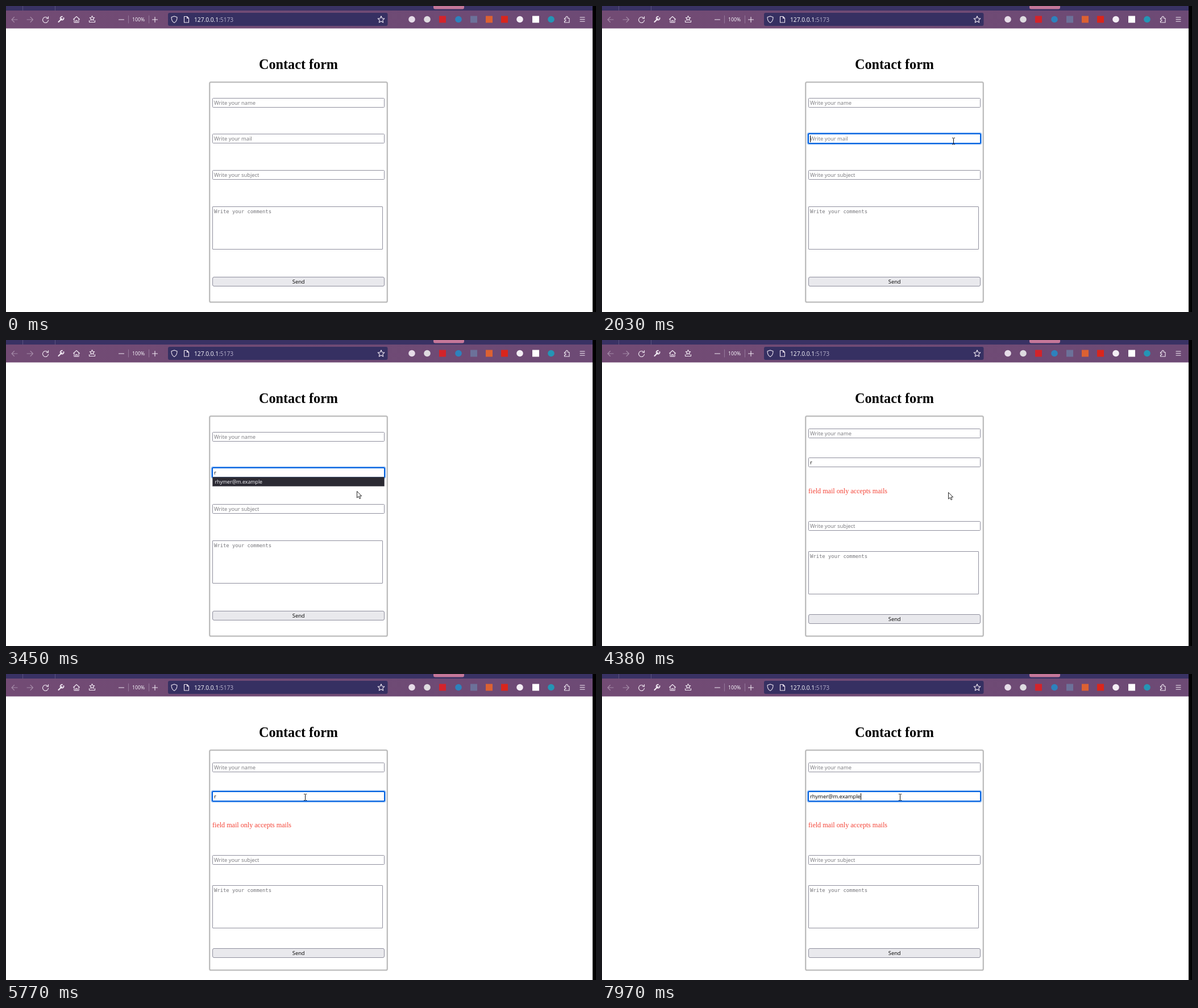
Recreate the animation shown at these times as an HTML page. Size 1038 px wide and 539 px high, loop 8 s.

```html
<!DOCTYPE html>
<html lang="en">
<head>
<meta charset="utf-8">
<title>Contact form</title>
<style>
  html, body { margin: 0; width: 100%; height: 100%; overflow: hidden; background: #fff; }
  svg { display: block; width: 1038px; height: 539px; }
  text { font: 9.35px "Open Sans", sans-serif; fill: #000; white-space: pre; }
  .hint { fill: #75757a; }
  .mono { font: 8.83px "DejaVu Sans Mono", monospace; }
  .title { font: bold 24.2px "Liberation Serif", serif; }
  .error { font: 12.1px "Liberation Serif", serif; fill: #f44336; }
  .url { font-size: 10.2px; fill: #fbfbfe; }
  .zoom { font-size: 8.7px; fill: #fbfbfe; }
  .option { font-size: 8.8px; fill: #fbfbfe; }
  .box { fill: #fff; stroke: #8f8f9d; }
  .box.hover { stroke: #676774; }
  .icons { fill: none; stroke: #f2eaf4; stroke-width: 1.1; stroke-linecap: round; stroke-linejoin: round; }
</style>
</head>
<body>
<svg viewBox="0 0 1038 539" xmlns="http://www.w3.org/2000/svg">
  <defs>
    <linearGradient id="bar">
      <stop offset="0" stop-color="#724b74"/>
      <stop offset="1" stop-color="#6d4a75"/>
    </linearGradient>
  </defs>

  <rect width="1032" height="9" fill="#393264"/>
  <path d="M29.5 0V8M86.5 0V8" stroke="#5a527f"/>
  <rect x="752" y="-6" width="54" height="11.5" rx="3" fill="#c57799"/>
  <rect y="8" width="1032" height="31.5" fill="url(#bar)"/>
  <rect x="285" y="12" width="386.5" height="23" rx="3" fill="#363062"/>
  <g class="icons">
    <path opacity=".4" d="M20 24H10M14.5 19.5L10 24L14.5 28.5M37 24H47.500M43 19.500L47.500 24L43 28.500"/>
    <path d="M73.500 21.500A5 5 0 1 0 74.500 25M74.500 18.500V22H71"/>
    <path stroke-width="2.2" d="M92.500 28L98 22.500"/>
    <path stroke-width="1.800" d="M101.500 21A3 3 0 1 1 99 18.700"/>
    <path d="M118.500 23.500L124 18.500L129.500 23.500M120 22.500V29H128V22.500M122.700 29V25.500H125.300V29"/>
    <path d="M151.500 17.500L152.800 20.300L155.700 20.600L153.500 22.500L154.200 25.300L151.500 23.900L148.800 25.300L149.500 22.500L147.300 20.600L150.200 20.300ZM146.500 25.500V28.500H156.500V25.500"/>
    <path d="M198.500 24H207.500M257.500 24H266.500M262 19.500V28.500"/>
    <path stroke="#95779a" d="M215.500 17V30M251.500 17V30"/>
    <path d="M296 18L301 19.800C301 25 299.500 27.800 296 29.500C292.500 27.800 291 25 291 19.800Z"/>
    <path d="M313.500 18.500H318.500L321.500 21.500V29H313.500ZM318.500 18.500V21.500H321.500"/>
    <path d="M660 17.800L661.800 21.700L665.800 22.100L662.800 24.900L663.700 29L660 26.900L656.300 29L657.200 24.900L654.200 22.100L658.200 21.700Z"/>
    <path d="M982.500 21.500H985V20A1.700 1.700 0 0 1 988.400 20V21.500H991V29H982.500V26.500H984A1.500 1.500 0 0 0 984 23.700H982.500Z"/>
    <path d="M1010 20H1018M1010 23.500H1018M1010 27H1018"/>
  </g>
  <g id="addons"></g>
  <text class="zoom" x="222" y="27">100%</text>
  <text class="url" x="331" y="27.500">127.0.0.1<tspan fill="#b7b1cc">:5173</tspan></text>
  <rect x="1032" width="6" height="539" fill="#000"/>

  <text class="title" x="514.500" y="111" text-anchor="middle">Contact form</text>
  <rect x="358.200" y="134.100" width="312.600" height="387.600" rx="2.500" fill="none" stroke="#bcbcbc" stroke-width="2.300"/>

  <g id="name"><rect class="box" x="363.500" y=".5" width="302" height="16" rx="1"/><text class="hint" x="366" y="12">Write your name</text></g>
  <g id="mail">
    <rect class="halo" x="361.500" y="-1.500" width="306" height="20" rx="3" fill="none" stroke="#a9cbf7" stroke-width="2"/>
    <rect class="box" x="363.500" y=".5" width="302" height="16" rx="1"/>
    <rect class="ring" x="363" y="0" width="303" height="17" rx="1.500" fill="none" stroke="#0060df" stroke-width="2"/>
    <text class="value" x="366" y="12"></text>
    <rect class="caret" y="3" width="1" height="12"/>
    <g class="list">
      <rect class="row" x="363.500" y="16.500" width="302" height="16" stroke="#55545e" stroke-width=".6"/>
      <text class="option" x="367.500" y="28">rhymer@m.example</text>
    </g>
  </g>
  <text id="error" class="error" x="363" y="270">field mail only accepts mails</text>
  <g id="subject"><rect class="box" x="363.500" y=".5" width="302" height="16" rx="1"/><text class="hint" x="366" y="12">Write your subject</text></g>
  <g id="comments"><rect class="box" x="363.500" y=".5" width="299" height="75" rx=".5"/><text class="hint mono" x="366" y="12">Write your comments</text></g>
  <g id="send"><rect x="363.500" y=".5" width="302" height="16" rx="2.500" fill="#e9e9ed" stroke="#8f8f9d"/><text x="514.700" y="12" text-anchor="middle">Send</text></g>

  <path id="arrow" d="M.5 .5V12L3.200 9.500L5 13.600L6.900 12.800L5.100 8.800H8.700Z" fill="#fff" stroke="#111" stroke-width=".9"/>
  <path id="beam" d="M-2.500 -5.500H-.8L0 -4.800L.8 -5.500H2.500M0 -4.800V4.800M-2.500 5.500H-.8L0 4.800L.8 5.500H2.500" fill="none" stroke="#111"/>
</svg>
<script>
const LOOP = 8000;
const ADDRESS = "rhymer@m.example";
const $ = selector => document.querySelector(selector);

// Toolbar badges: x, shape, colour
const badges = [
  [714, "circle", "#e6dce8"], [741, "circle", "#dedbe0"], [768, "square", "#d3242b"],
  [796, "circle", "#2d82bd"], [823, "square", "#6c7199"], [850, "square", "#dc6132"],
  [877, "square", "#d9261c"], [904, "circle", "#f3edf4"], [932, "square", "#ffffff"],
  [959, "circle", "#2495b5"]
];
$("#addons").innerHTML = badges.map(([x, shape, color]) => shape === "circle"
  ? `<circle cx="${x}" cy="23.500" r="5.800" fill="${color}"/>`
  : `<rect x="${x - 6}" y="17.500" width="12" height="12" fill="${color}"/>`).join("");

const layouts = {
  plain: { name: 162, mail: 225, subject: 289, comments: 353, send: 477 },
  invalid: { name: 156, mail: 207, subject: 319, comments: 372, send: 483 }
};
const fields = ["name", "mail", "subject", "comments"];

const easeOut = power => u => 1 - (1 - u) ** power;
const smooth = u => u * u * (3 - 2 * u);

// Pointer moves: start, end, samples, from, to, easing
const moves = [
  [450, 1210, 12, [984, 526], [666, 298], easeOut(1.5)],
  [1280, 1690, 7, [644, 281], [618, 238], easeOut(3)],
  [2950, 3450, 8, [618, 240], [617, 266], smooth],
  [4380, 4920, 9, [609, 268], [526, 217], smooth],
  [7970, 8000, 1, [524, 217], [524, 217], smooth]
];

// Typed text: time, number of characters
const typing = [[0, 0], [2690, 1], [5980, 2], [6100, 3], [6300, 4], [7220, ADDRESS.length]];

const focusTimes = [[1890, 3600], [5250, LOOP]];
const listTimes = [[2770, 3600], [6040, 7220]];
const selectTimes = [[6960, 7220]];
const caretTimes = [[1960, 2490], [2690, 3220], [5250, 5770], [5980, 6830], [7370, 7910], [7970, LOOP]];

const during = (spans, t) => spans.some(([from, to]) => t >= from && t < to);
const latest = (steps, t) => steps.filter(step => step[0] <= t).pop();
const show = (el, on) => el.setAttribute("visibility", on ? "visible" : "hidden");
const place = (el, x, y) => el.setAttribute("transform", `translate(${x} ${y})`);

function pointerAt(t) {
  const move = latest(moves, t);
  if (!move) return null;
  const [start, end, samples, from, to, ease] = move;
  const last = Math.max(1, samples - 1);
  const step = Math.min(last, Math.floor((t - start) / (end - start) * last + 0.03));
  const p = ease(step / last);
  return from.map((v, i) => Math.round(v + (to[i] - v) * p));
}

const parts = Object.fromEntries([...fields, "send"].map(id => [id, $("#" + id)]));
const [halo, ring, value, caret, list, row] =
  ["halo", "ring", "value", "caret", "list", "row"].map(name => $("#mail ." + name));
const error = $("#error"), arrow = $("#arrow"), beam = $("#beam");

function draw(t) {
  const invalid = t >= 3650;
  const tops = layouts[invalid ? "invalid" : "plain"];
  for (const id in parts) place(parts[id], 0, tops[id]);
  show(error, invalid);

  const count = latest(typing, t)[1];
  value.textContent = count ? ADDRESS.slice(0, count) : "Write your mail";
  value.setAttribute("class", count ? "value" : "value hint");
  caret.setAttribute("x", 366 + (count ? Math.round(value.getComputedTextLength()) : 0));
  show(caret, during(caretTimes, t));

  const focused = during(focusTimes, t), open = during(listTimes, t);
  show(halo, focused);
  show(ring, focused);
  show(list, open);

  const pointer = pointerAt(t);
  const [x, y] = pointer || [-99, -99];
  const listTop = tops.mail + 17;
  const overList = open && x < 667 && y >= listTop && y < listTop + 16;
  row.setAttribute("fill", overList || during(selectTimes, t) ? "#42414d" : "#2b2a33");

  const hovered = fields.find(id =>
    x >= 363 && x <= 666 && y >= tops[id] && y <= tops[id] + (id === "comments" ? 76 : 17));
  for (const id of fields) parts[id].querySelector(".box").classList.toggle("hover", id === hovered);
  const textCursor = Boolean(hovered) && !overList;
  show(arrow, pointer && !textCursor);
  show(beam, pointer && textCursor);
  place(arrow, x, y);
  place(beam, x + 0.5, y);
}

function tick() {
  draw(performance.now() % LOOP);
  requestAnimationFrame(tick);
}
tick();
</script>
</body>
</html>
```
